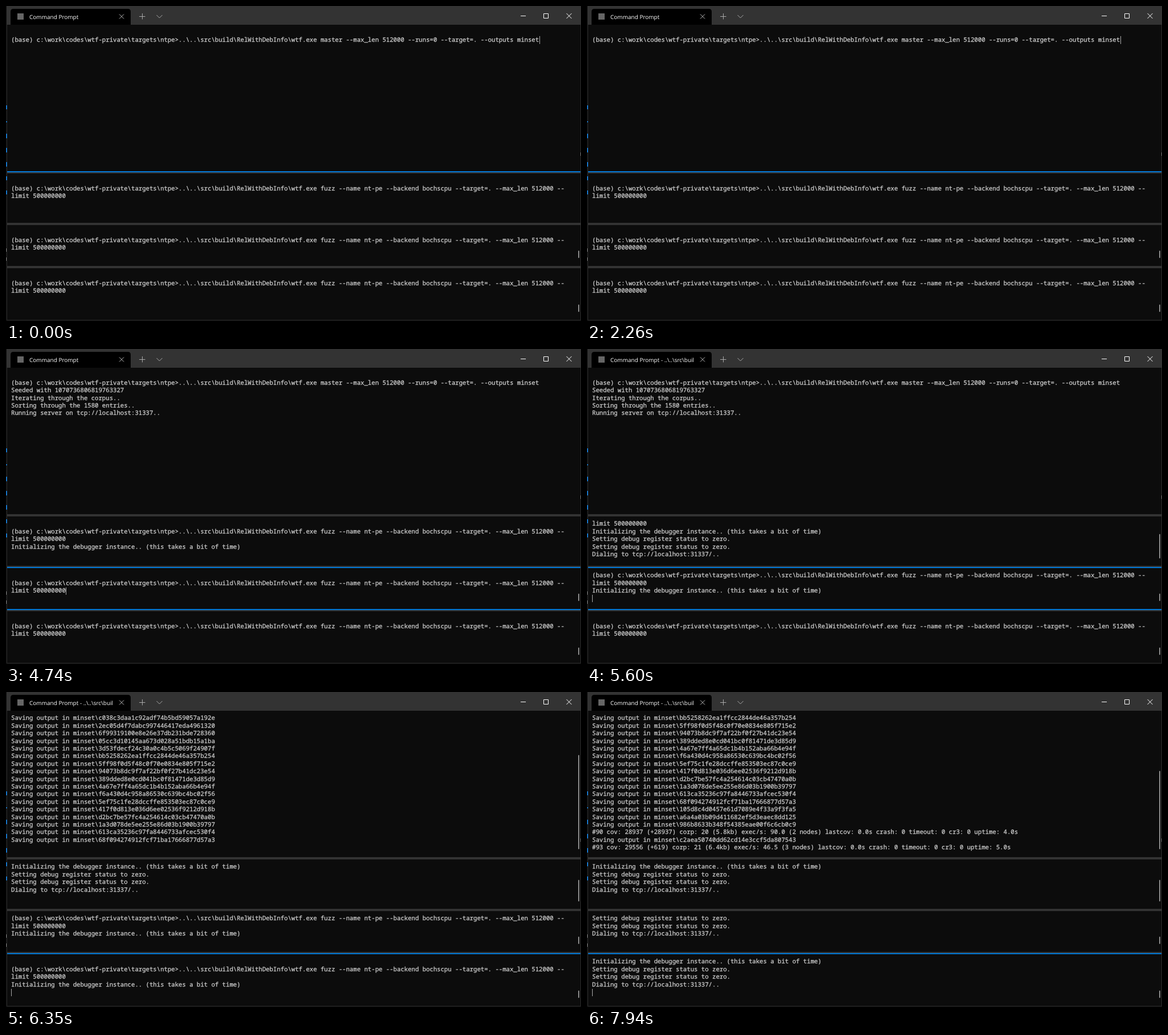
These frames come from a looping animation (1010x555 px, 8000 ms). An HTML page:

```html
<!DOCTYPE html>
<html lang="en">
<head>
<meta charset="utf-8">
<title>Terminal</title>
<style>
html, body { margin: 0; width: 100%; height: 100%; overflow: hidden; background: #0c0c0c; }
#stage { position: relative; width: 1010px; height: 555px; overflow: hidden; background: #0c0c0c; }
#stage > * { position: absolute; margin: 0; }
svg { left: 0; top: 0; }
pre { left: 9px; color: #ccc; font: 10.667px/13.4px "Noto Sans Mono", monospace;
  -webkit-text-stroke: .3px #ccc; text-rendering: geometricPrecision; font-variant-ligatures: none; }
#title { left: 41px; top: 11px; width: 147px; overflow: hidden; white-space: pre; color: #fff;
  font: 10px/16px "Open Sans", sans-serif; text-rendering: geometricPrecision; }
.edge { left: 2px; width: 1007px; height: 2px; }
.thumb { left: 1005px; width: 2px; background: #8a8a8a; border-radius: 1px; }
#cursor { width: 1px; height: 13.4px; background: #aaa; }
</style>
</head>
<body>
<div id="stage">
<svg width="1010" height="555" fill="none">
  <path d="M1 0H1010V33H1Z" fill="#333"/>
  <path d="M8 33V10Q8 5 13 5H214Q219 5 219 10V33Z" fill="#000"/>
  <path d="M1.5 33V553.5H1009.5V33" stroke="#2b2b2b"/>
  <path d="M1 175v7M1 203v2M1 225v8M1 250v8M1 275v8M1 300v7M1 325v7" stroke="#1873c4" stroke-width="2"/>
  <path d="M.5 427v6M.5 443v6M1009.5 258v6" stroke="#777"/>
  <path d="M20 13h11v11h-11Z" fill="#666"/>
  <path d="M199 14.5l8 8m0-8l-8 8" stroke="#bbb"/>
  <path d="M234 18.5h10.5M239.5 13v10.5M264.5 16l5 5 5-5" stroke="#aaa"/>
  <path d="M904 17.5h9M944.5 13.5h8v8h-8ZM984.5 13l9 9m0-9l-9 9" stroke="#fff"/>
</svg>
<div id="title"></div>
</div>
<script>
const LOOP = 8000, ROW = 13.4, COL = 6.4;
const stage = document.getElementById('stage'), title = document.getElementById('title');

const prompt = '\n(base) c:\\work\\codes\\wtf-private\\targets\\ntpe>..\\..\\src\\build\\RelWithDebInfo\\wtf.exe ';
const master = prompt + 'master --max_len 512000 --runs=0 --target=. --outputs minset';
const fuzz = prompt + 'fuzz --name nt-pe --backend bochscpu --target=. --max_len 512000 --\nlimit 500000000';
const init = 'Initializing the debugger instance.. (this takes a bit of time)\n';
const setting = 'Setting debug register status to zero.\n'.repeat(2);
const dial = 'Dialing to tcp://localhost:31337/..';

const hashes = `c038c3daa1c92adf74b5bd59057a192e 2ec05d4f7dabc997446417eda4961320
6f99319100e8e26e37db231bde728360 05cc3d10145aa673d028a51bdb15a1ba
3d53fdecf24c30a0c4b5c5069f24907f bb5258262ea1ffcc2844de46a357b254
5ff98f0d5f48c0f70e0834e805f715e2 94073b8dc9f7af22bf0f27b41dc23e54
389dded8e0cd041bc0f81471de3d85d9 4a67e7ff4a65dc1b4b152aba66b4e94f
f6a430d4c958a86530c639bc4bc02f56 5ef75c1fe28dccffe853503ec87c0ce9
417f0d813e036d6ee02536f9212d918b d2bc7be57fc4a254614c03cb47470a0b
1a3d078de5ee255e86d03b1900b39797 613ca35236c97fa8446733afcec530f4
68f094274912fcf71ba17666877d57a3 105d8c4d0457e61d7089e4f33a9f3fa5
a6a4a03b09d411682ef5d3eaec8dd125 986b8633b348f54385eae00f6c6cb0c9
c2aea50740dd62cd14e3ccf5da807543`.split(/\s+/);
const save = n => hashes.splice(0, n).map(h => `Saving output in minset\\${h}\n`).join('');

// Each pane: row area, separators, scroll thumb, and output as [time, text]; run = time of Enter
const panes = [
  { top: 40, rows: 18, edges: [291], end: 277, track: 230.67, run: 2790, log: [
    [0, master],
    [2790, '\nSeeded with 1070736806819763327\nIterating through the corpus..\nSorting through the 1580 entries..\n'],
    [3670, 'Running server on tcp://localhost:31337..\n'],
    [5650, '#0 cov: 0 (+0) corp: 0 (0.0b) exec/s: -nan (1 nodes) lastcov: 2.0s crash: 0 timeout: 0 cr3: 0 uptime: 2.0s\n'],
    [5720, save(2)], [5790, save(3)], [5860, save(2)], [5930, save(3)], [5990, save(3)], [6060, save(3)],
    [6130, save(1)], [6420, save(1)], [6480, save(1)], [6550, save(1)],
    [6880, '#90 cov: 28937 (+28937) corp: 20 (5.8kb) exec/s: 90.0 (2 nodes) lastcov: 0.0s crash: 0 timeout: 0 cr3: 0 uptime: 4.0s'],
    [6950, '\n'], [7480, save(1)],
    [7940, '#93 cov: 29556 (+619) corp: 21 (6.4kb) exec/s: 46.5 (3 nodes) lastcov: 0.0s crash: 0 timeout: 0 cr3: 0 uptime: 5.0s']] },
  { top: 302, rows: 5, edges: [293, 382], end: 368.5, track: 59.5, run: 4130, log: [
    [0, fuzz], [4130, '\n'], [4200, init], [5340, setting], [5600, dial], [5650, '\n']] },
  { top: 392.7, rows: 4, edges: [384, 458], end: 444, thumb: 13, run: 5190, log: [
    [0, fuzz], [5190, '\n' + init], [6420, setting], [6480, dial], [6550, '\n']] },
  { top: 469, rows: 5, edges: [460], end: 539, thumb: 13, run: 6280, log: [
    [0, fuzz], [6280, '\n'], [6350, init], [7670, setting], [7940, dial + '\n']] }
];
const focusTimes = [0, 3470, 4740, 5930];
const cursorOff = [[260, 1190], [1730, 2260], [4660, 4740], [5720, 5930], [6950, 7480]];

function add(tag, cls, top) {
  const el = document.createElement(tag);
  el.className = cls;
  el.style.top = top + 'px';
  return stage.appendChild(el);
}
for (const p of panes) {
  p.pre = add('pre', '', p.top + 0.4);
  p.lines = p.edges.map(y => add('div', 'edge', y));
  p.bar = add('div', 'thumb', 0);
}
const cursor = add('div', '', 0);
cursor.id = 'cursor';

function draw(t) {
  const focus = focusTimes.filter(s => s <= t).length - 1;
  panes.forEach((p, i) => {
    const all = p.log.filter(e => e[0] <= t).map(e => e[1]).join('').split('\n');
    const view = all.slice(-p.rows), text = view.join('\n');
    // The leading newline of a pre is kept when set as text
    if (p.text !== text) p.pre.textContent = p.text = text;

    const h = p.thumb || (all.length > p.rows ? p.track * p.rows / all.length : 0);
    p.bar.style.top = p.end - h + 'px';
    p.bar.style.height = h + 'px';
    for (const line of p.lines) line.style.background = i === focus ? '#0078d7' : '#333';

    if (i === focus) {
      cursor.style.left = 9 + Math.floor(view[view.length - 1].length * COL) + 'px';
      cursor.style.top = p.top + (view.length - 1) * ROW + 'px';
      title.textContent = 'Command Prompt' + (t >= p.run ? ' - ..\\..\\src\\buil' : '');
    }
  });
  cursor.hidden = cursorOff.some(([a, b]) => t >= a && t < b);
}

const start = performance.now();
function tick() {
  draw((performance.now() - start) % LOOP);
  requestAnimationFrame(tick);
}
tick();
</script>
</body>
</html>
```
